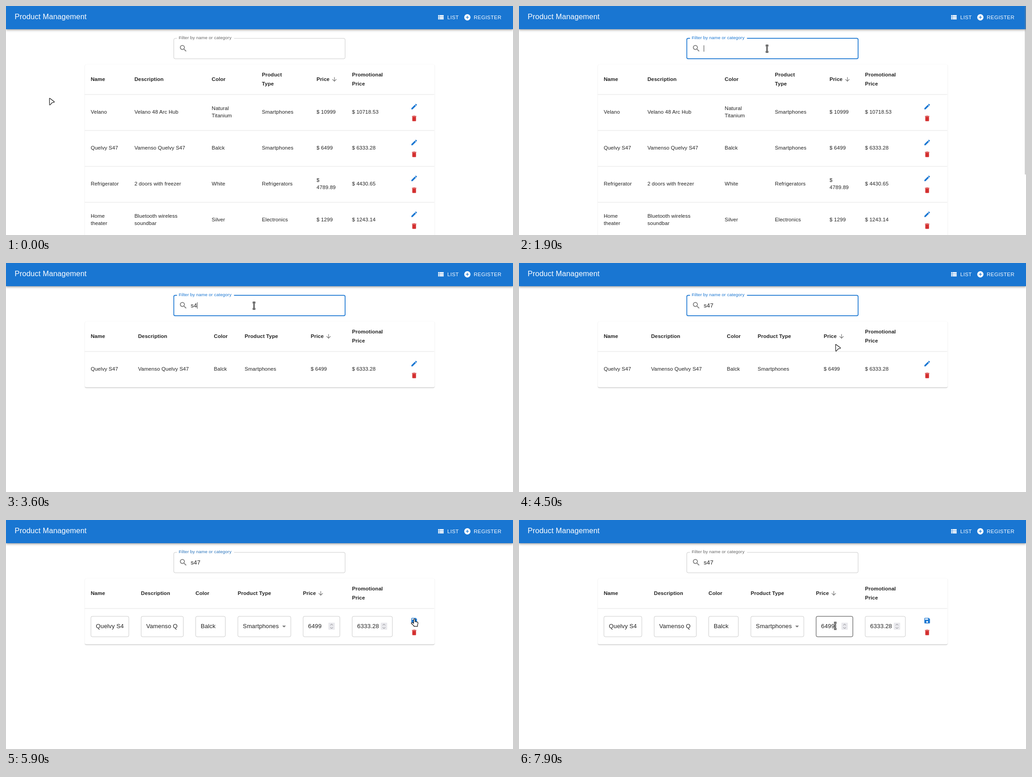
Recreate the animation shown at these times as an HTML page. Size 1111 px wide and 504 px high, loop 8000 ms.

```html
<!DOCTYPE html>
<html lang="en">
<head>
<meta charset="utf-8">
<title>Product Management</title>
<style>
  html, body { margin: 0; width: 100%; height: 100%; overflow: hidden; background: #fff; }
  #bar, #paper, svg { position: absolute; left: 0; top: 0; }
  #bar {
    width: 1111px; height: 51px; background: #1976d2;
    box-shadow: 0 1.6px 3.3px -.8px rgba(0,0,0,.2), 0 3.3px 4px rgba(0,0,0,.14), 0 .8px 8px rgba(0,0,0,.12);
  }
  #paper {
    left: 172.5px; top: 129px; width: 766px; border-radius: 3.3px; background: #fff;
    box-shadow: 0 1.6px .8px -.8px rgba(0,0,0,.2), 0 .8px .8px rgba(0,0,0,.14), 0 .8px 2.4px rgba(0,0,0,.12);
  }
  text { font: 11.386px "Liberation Sans", Arial, sans-serif; letter-spacing: .0107em; fill: rgba(0,0,0,.87); white-space: pre; }
  .head { font-weight: bold; }
  .title { font-size: 16.27px; letter-spacing: .0075em; fill: #fff; }
  .button { letter-spacing: .0286em; fill: #fff; }
  .value { font-size: 13.01px; letter-spacing: .0094em; }
  .label { font-size: 9.76px; letter-spacing: .0094em; }
  .field { fill: none; stroke: rgba(0,0,0,.23); stroke-width: .9; }
  .field.hot { stroke: rgba(0,0,0,.87); }
  .field.focus { stroke: #1976d2; stroke-width: 1.7; }
  .chevron { fill: none; stroke: #77777f; stroke-width: 1; }
  .outline { fill: #fff; stroke: #111; stroke-width: 1.2; stroke-linejoin: round; }
</style>
</head>
<body>
<div id="paper"></div>
<div id="bar"></div>
<svg id="stage" width="1111" height="504" viewBox="0 0 1111 504"></svg>
<script>
const LOOP = 8000, STEP = 100;
const BLUE = '#1976d2', RED = '#d32f2f', GREY = 'rgba(0,0,0,.54)';

const ICONS = {
  list: 'M3 14h4v-4H3zm0 5h4v-4H3zM3 9h4V5H3zm5 5h13v-4H8zm0 5h13v-4H8zM8 5v4h13V5z',
  add: 'M12 2C6.48 2 2 6.48 2 12s4.48 10 10 10 10-4.48 10-10S17.52 2 12 2m5 11h-4v4h-2v-4H7v-2h4V7h2v4h4z',
  search: 'M15.5 14h-.79l-.28-.27C15.41 12.59 16 11.11 16 9.5 16 5.91 13.09 3 9.5 3S3 5.91 3 9.5 5.91 16 9.5 16c1.61 0 3.09-.59 4.23-1.57l.27.28v.79l5 4.99L20.49 19zm-6 0C7.01 14 5 11.99 5 9.5S7.01 5 9.5 5 14 7.01 14 9.5 11.99 14 9.5 14',
  down: 'm20 12-1.41-1.41L13 16.17V4h-2v12.17l-5.58-5.59L4 12l8 8z',
  edit: 'M3 17.25V21h3.75L17.81 9.94l-3.75-3.75zM20.71 7.04c.39-.39.39-1.02 0-1.41l-2.34-2.34a1 1 0 0 0-1.41 0l-1.83 1.83 3.75 3.75z',
  trash: 'M6 19c0 1.1.9 2 2 2h8c1.1 0 2-.9 2-2V7H6zM19 4h-3.5l-1-1h-5l-1 1H5v2h14z',
  save: 'M17 3H5c-1.11 0-2 .9-2 2v14c0 1.1.89 2 2 2h14c1.1 0 2-.9 2-2V7zm-5 16c-1.66 0-3-1.34-3-3s1.34-3 3-3 3 1.34 3 3-1.34 3-3 3m3-10H5V5h10z',
  drop: 'm7 10 5 5 5-5z'
};

const icon = (name, cx, cy, size, fill) =>
  `<path d="${ICONS[name]}" fill="${fill}" transform="translate(${cx - size / 2} ${cy - size / 2}) scale(${size / 24})"/>`;

const text = (x, y, s, cls = '', id = '') => `<text x="${x}" y="${y}" class="${cls}" id="${id}">${s}</text>`;

// Lines of text centred vertically on cy.
const lines = (x, cy, s, lineHeight, cls) => s.split('\n').map((part, i, all) =>
  text(x, cy + 4.1 + (i - (all.length - 1) / 2) * lineHeight, part, cls)).join('');

const field = (x1, x2, id) =>
  `<rect class="field" id="${id}" x="${x1}" y="212" width="${x2 - x1}" height="45" rx="3.2"/>`;

const spinner = cx => `<rect x="${cx - 7}" y="226" width="14" height="15.5" rx="1" fill="#e9e9ed"/>
  <path class="chevron" d="M${cx - 2.8} 231.8l2.8-2.8 2.8 2.8m-5.6 4.4l2.8 2.8 2.8-2.8"/>`;

const HEADINGS = ['Name', 'Description', 'Color', 'Product\nType', 'Price', 'Promotional\nPrice'];

function header(columns, headings) {
  return headings.map((s, i) => lines(columns[i], 160.9, s, 19.5, 'head')).join('')
    + icon('down', columns[4] + 39, 161.5, 14.64, GREY) + divider(194.8);
}

const divider = y => `<path d="M172.5 ${y}H938.5" stroke="#e0e0e0" stroke-width=".9"/>`;

const actions = (cy, first) => icon(first, 894.4, cy - 11.5, 16.27, BLUE) + icon('trash', 894.4, cy + 14.5, 16.27, RED);

const row = (columns, cells, i) => {
  const cy = 233 + 79 * i;
  return cells.map((s, c) => lines(columns[c], cy, s, 16.3)).join('') + actions(cy, 'edit') + divider(cy + 41);
};

const PHONE = ['Quelvy S47', 'Vamenso Quelvy S47', 'Balck', 'Smartphones', '$ 6499', '$ 6333.28'];
const PRODUCTS = [
  ['Velano', 'Velano 48 Arc Hub', 'Natural\nTitanium', 'Smartphones', '$ 10999', '$ 10718.53'],
  PHONE,
  ['Refrigerator', '2 doors with freezer', 'White', 'Refrigerators', '$\n4789.89', '$ 4430.65'],
  ['Home\ntheater', 'Bluetooth wireless\nsoundbar', 'Silver', 'Electronics', '$ 1299', '$ 1243.14']
];

function fullTable() {
  const columns = [185.7, 281.4, 450.8, 560.8, 680.6, 758.2];
  return header(columns, HEADINGS) + PRODUCTS.map((cells, i) => row(columns, cells, i)).join('');
}

const WIDE_HEADINGS = HEADINGS.map(s => s.replace('Product\n', 'Product '));

function filteredTable() {
  const columns = [185.7, 289.4, 455.6, 523, 667.8, 758.2];
  return header(columns, WIDE_HEADINGS) + row(columns, PHONE, 0);
}

function editTable() {
  const columns = [185.7, 295.8, 415.3, 507.7, 650.7, 758.2];
  const ends = [269.5, 389, 481, 624.5, 732, 847];
  const values = ['Quelvy S4', 'Vamenso Q', 'Balck', 'Smartphones', '6499', '6333.28'];
  return header(columns, WIDE_HEADINGS)
    + values.map((s, i) => field(columns[i] + .4, ends[i] - .4, 'field' + i) + text(columns[i] + 11.4, 238.1, s, 'value')).join('')
    + icon('drop', 609.3, 234, 19.5, GREY) + spinner(713.5) + spinner(828.3)
    + '<rect id="hover" x="873" y="208.5" width="52" height="26" rx="3.2" fill="rgba(25,118,210,.04)"/>'
    + actions(233, 'save') + divider(274);
}

const IBEAM = 'M-3-7.2h2l1 .8 1-.8h2M0-6.4V6.4M-3 7.2h2l1-.8 1 .8h2';

document.getElementById('stage').innerHTML =
  text(19, 29.4, 'Product Management', 'title')
  + icon('list', 953, 24.8, 16.27, '#fff') + text(967, 28.7, 'LIST', 'button')
  + icon('add', 1011, 24.9, 16.27, '#fff') + text(1025, 28.7, 'REGISTER', 'button')
  + '<rect class="field" id="search" x="367.7" y="71.2" width="375.4" height="45" rx="3.2"/>'
  + '<path d="M374.8 71.5H499.6" stroke="#fff" stroke-width="4"/>'
  + text(378.5, 72.6, 'Filter by name or category', 'label', 'label')
  + icon('search', 388.5, 93.3, 19.5, GREY) + text(404.7, 97.5, '', 'value', 'query')
  + '<rect id="caret" y="86.5" width=".9" height="14" fill="#222"/>'
  + `<g id="full">${fullTable()}</g><g id="filtered">${filteredTable()}</g><g id="edit">${editTable()}</g>`
  + '<rect id="scrollbar" x="1108.4" y="1" width="2.6" rx="1.2" fill="#858585"/>'
  + `<g id="pointer">
      <path id="arrow" class="outline" d="M.2 .4Q.4-.3 1.2.3L10.6 7.4Q11.6 8.4 10.3 8.9L5.6 10 2 14.4Q.6 15.6.4 14Z"/>
      <g id="ibeam" fill="none"><path d="${IBEAM}" stroke="#111" stroke-width="3.2"/><path d="${IBEAM}" stroke="#fff" stroke-width="1"/></g>
      <path id="hand" class="outline" d="M-1.6 9V1.2a1.5 1.5 0 0 1 3 0V5.6L5.6 6.3Q8 6.8 7.8 9.4L7 13.2V16H-.8Q-2-.0-2 15L-6.6 9.4Q-7.4 7.9-5.8 7.4-4.6 7.2-1.6 9.6Z"/>
    </g>`;

const $ = id => document.getElementById(id);
$('hand').setAttribute('d', 'M-1.6 9.4V1.2a1.5 1.5 0 0 1 3 0V5.6L5.6 6.3Q8 6.8 7.8 9.4L6.8 13.4V16.2H-1.2V14.8L-6.6 9.8Q-7.4 8.3-5.8 7.8-4.4 7.5-1.6 9.4Z');

// Pointer hot spot: time, x, y.
const PATH = [
  [0, 95, 203], [600, 95, 203], [1200, 545, 94], [1300, 545, 94], [1400, 544.5, 92.5], [1600, 544.5, 92.5],
  [1900, 543.5, 94], [4100, 543.5, 94], [4600, 711, 189], [4700, 711, 189], [5200, 896, 213], [5400, 895.5, 217.5],
  [5500, 895.5, 217.5], [5600, 895, 218], [6700, 895, 218], [6900, 800, 238], [7000, 721, 234],
  [7100, 721, 234], [7200, 690, 233], [7600, 690, 233], [7900, 693, 233], [LOOP, 693, 233]
];

const ramp = (t, from, to) => Math.min(1, Math.max(0, (t - from) / (to - from)));

function pointerAt(t) {
  const i = PATH.findIndex(p => p[0] > t);
  const [t0, x0, y0] = PATH[i - 1], [t1, x1, y1] = PATH[i];
  const k = ramp(t, t0, t1), eased = k * k * (3 - 2 * k);
  return [x0 + (x1 - x0) * eased, y0 + (y1 - y0) * eased];
}

const show = (id, visible) => { $(id).style.display = visible ? '' : 'none'; };
const within = (t, from, to) => t >= from && t < to;

function draw(now) {
  const t = Math.floor(now % LOOP / STEP) * STEP;
  const editing = t >= 5900, filtered = t >= 3600;

  show('full', !filtered);
  show('filtered', filtered && !editing);
  show('edit', editing);
  $('paper').style.height = filtered ? '145.3px' : '600px';

  const [x, y] = pointerAt(t);
  const overSearch = x > 367 && x < 743 && y > 71 && y < 117;
  const overButton = x > 873 && x < 925 && y > 208 && y < 261;
  const overInput = editing && y > 212 && y < 257 && (x > 651 && x < 732 || x > 758 && x < 848);
  const shape = overButton ? 'hand' : overSearch || overInput ? 'ibeam' : 'arrow';
  for (const id of ['arrow', 'ibeam', 'hand']) show(id, id === shape);
  $('pointer').setAttribute('transform', `translate(${x} ${y})`);

  const focused = within(t, 1700, 5900);
  $('search').setAttribute('class', 'field' + (focused ? ' focus' : overSearch ? ' hot' : ''));
  const blue = ramp(t, 1600, 1900) - ramp(t, 5800, 6300);
  $('label').style.fill = `rgb(${[25, 118, 210].map(c => 102 + (c - 102) * blue)})`;

  const query = 's47'.slice(0, t >= 3700 ? 3 : t >= 3600 ? 2 : t >= 3100 ? 1 : 0);
  $('query').textContent = query;
  $('caret').setAttribute('x', 404.7 + [0, 6.6, 14, 21.3][query.length]);
  show('caret', within(t, 1700, 2100) || within(t, 3100, 4200) || within(t, 4800, 5200));

  $('scrollbar').setAttribute('height', t < 3200 ? 370 : 423);
  const fade = t < 3000 ? ramp(t, 600, 800) - ramp(t, 1600, 2100) : 1;
  $('scrollbar').style.opacity = filtered ? 0 : fade;

  $('hover').style.opacity = ramp(t, 6100, 6400) - ramp(t, 6700, 7000);
  $('field4').classList.toggle('hot', t >= 7200);
  $('field5').classList.toggle('hot', within(t, 6900, 7000));
}

function tick() {
  draw(performance.now());
  requestAnimationFrame(tick);
}
tick();
</script>
</body>
</html>
```
